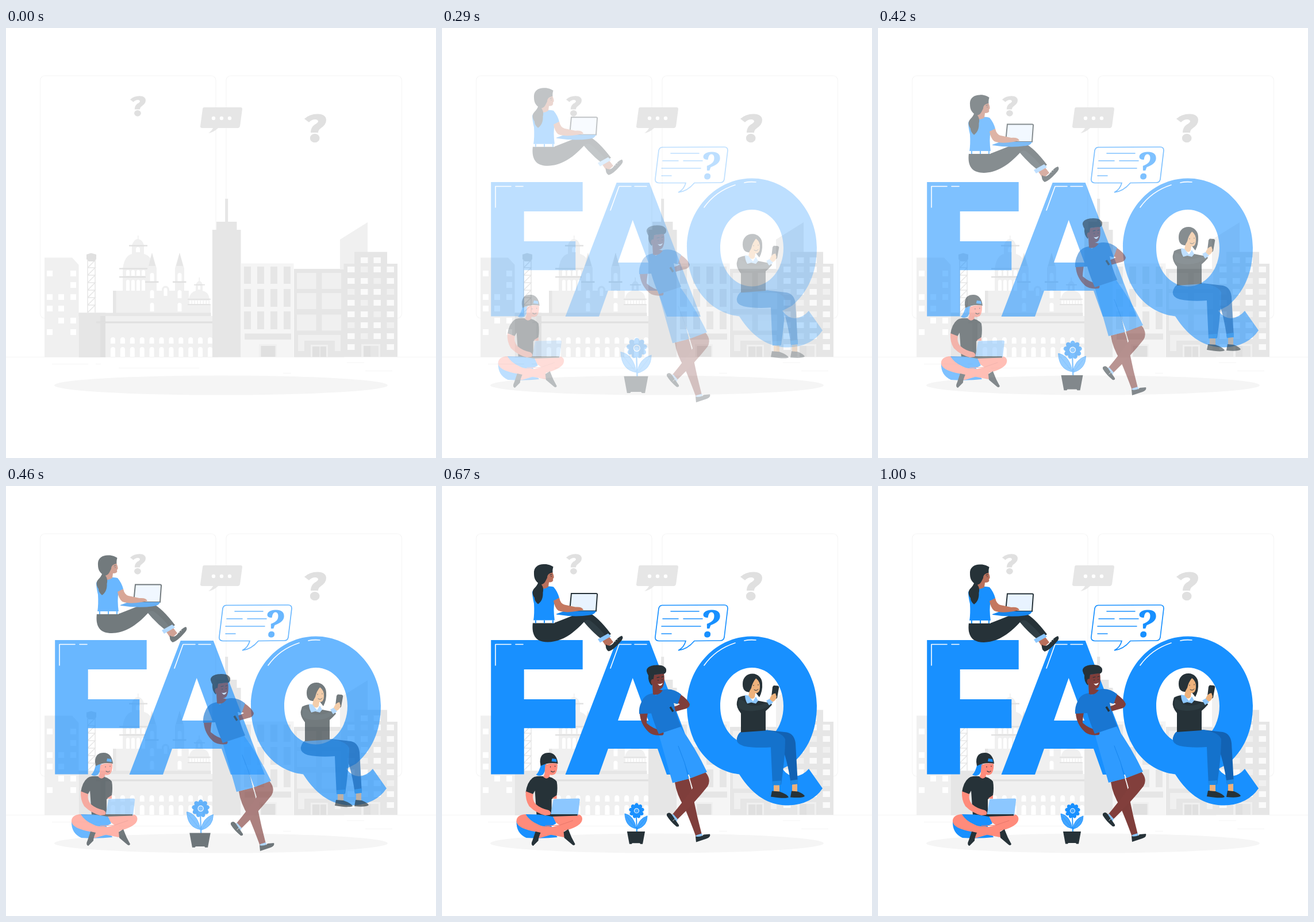
Animation of 748x748 px, one loop 1.04 s. Source, as an HTML page:

```html
<!DOCTYPE html>
<html lang="en">
<head>
<meta charset="utf-8">
<title>FAQ</title>
<style>
html, body { margin: 0; width: 100%; height: 100%; overflow: hidden; background: #fff; }
svg { display: block; width: 100vw; height: 100vh; }
.line { fill: none; stroke-linecap: round; stroke-linejoin: round; }
</style>
</head>
<body>
<svg viewBox="0 0 748 748" aria-label="FAQ">
  <defs>
    <g id="ask">
      <path d="M519 158Q528 149.500 542 149.500C552 149.500 557 154 557 160Q557 168 548 174Q543 177 543 182H530Q530 173 537 168Q543 165 543 162Q542 159 538 159Q532 159 527 164Z"/>
      <ellipse cx="537.200" cy="191.700" rx="8.300" ry="7.600"/>
    </g>
  </defs>

  <g fill="none" stroke="#f5f5f5" stroke-width="1.2">
    <rect x="59.5" y="83" width="305.5" height="422" rx="8"/>
    <rect x="383" y="83" width="305.5" height="422" rx="8"/>
    <path d="M0 572.5H748M80 584.5H143M156 584.5H165M196 591.5H336M482 600.5H496M593 582H623M625 596.5H672"/>
  </g>
  <ellipse cx="374" cy="621.5" rx="290" ry="17" fill="#f5f5f5"/>
  <g id="city"></g>
  <path d="M345 138H408Q411 138 411 141L407 171Q406 174 403 174H369Q362 181 352 183Q358 179 360 174H341Q338 174 338 171L342 141Q342 138 345 138Z" fill="#e6e6e6"/>
  <g fill="#fff"><circle cx="361" cy="157" r="3.2"/><circle cx="375" cy="157" r="3.2"/><circle cx="389" cy="157" r="3.2"/></g>
  <g fill="#e0e0e0"><use href="#ask"/><use href="#ask" transform="translate(-152.5 12.2) scale(.71)"/></g>

  <g id="letters">
    <g fill="#1890ff">
      <path d="M85.200 268H244.700V319H142.700V371H232.300V421.300H142.700V501.500H85.200Z"/>
      <path fill-rule="evenodd" d="M303.700 269H360.700L450 502H391L375 457H289L273 502H214.500ZM331.700 334L306 408H359Z"/>
      <path fill-rule="evenodd" d="M426 382C426 315 477 261.500 539 261.500S652 315 652 382C652 428 635 461 609 483L592 492Q602 505 614 505Q628 504 638 492L662 526Q643 554 603 555.500C575 556 545 545 517 501.500C463 495 426 447 426 382ZM484 382.500C484 420 508 449.500 539 449.500S594 420 594 382.500S570 316 539 316S484 345 484 382.500Z"/>
    </g>
    <path class="line" stroke="#fff" stroke-width="1.6" d="M93 312V275.500H120M128 275.500H141M293 317L308 275.500H329M335 275.500H356M456 312Q476 284 510 273M526 269Q535 267 546 268"/>
  </g>

  <g id="bubble">
    <path d="M383 207.500L491 207Q497 207 497 213L491 263Q490 269 484 269L439 269.500Q427 284 411 286Q421 281 424 269.500H377Q370 269 371 262L377 213Q378 208 383 207.500Z" fill="#fff" stroke="#1890ff" stroke-width="1.7"/>
    <path class="line" stroke="#1890ff" stroke-width="1.6" d="M398 218H447M384 231H411M420 231H453M382 244H450M382 257H399"/>
    <text x="448" y="263" fill="#1890ff" font-family="'Noto Serif', serif" font-size="65" font-weight="700" font-style="italic">?</text>
  </g>

  <g id="reader">
    <path fill="#1890ff" d="M166 178Q184 173 194 176Q201 184 204 195L196 201Q193 213 196 235H159Q161 222 160 205Q157 192 157 185Q158 180 166 178Z"/>
    <path fill="#b9705c" d="M178 150H192Q195 157 194.500 160L193 162Q195 168 186 168L185 176Q178 181 172 178L173 160Z"/>
    <path fill="#263238" d="M160 153C159 142 167 136.500 177 136.500C185 136 190 139 193.500 141Q192 146 192.500 151C186 152 183 155 183 160L180 166C178 170 175 171 173 172C176 176 177 180 175.500 186C176 195 173 202 167 206C164 203 161 200 161 195C156 188 157 182 161 178C164 175 166 172 167 169C162 165 160 160 160 153Z"/>
    <path class="line" stroke="#263238" d="M188 155L191 154M190 157V158"/>
    <path fill="#263238" d="M158 238H197Q215 231 235 223Q247 218 256 221Q272 229 294 258L279 268Q262 255 247 237C225 261 205 271.500 184 272C165 272 155 262 158 238Z"/>
    <path fill="#37474f" d="M247 237Q250 232 257 234Q273 246 286 263L279 268Q262 255 247 237Z" opacity=".55"/>
    <path fill="#fff" d="M159 234H196V239H158Z"/>
    <path stroke="#1890ff" stroke-width="2" d="M163 234V239M178 234V239M193 234V239"/>
    <path d="M225 187.500H268Q270.500 187.500 270 190L268 218H222Z" fill="#e8f3ff" stroke="#263238" stroke-width="2"/>
    <path fill="#1685ee" d="M199 223L213 218L268 218Q266 224 257 225Q230 229 199 224Z"/>
    <path fill="#c4785f" d="M194 200L204 195Q206 205 213 207L232 211Q244 210 246 216L236 218Q214 222 202 217Q196 212 194 200Z"/>
    <path fill="#b9705c" d="M279 270L291 263L298 272L287 282Z"/>
    <path fill="#8cc7ff" d="M271 267L289 257L294 262L275 273Z"/>
    <path fill="#263238" d="M285 276Q292 281 298 274Q306 263 313 261Q317 265 310 272Q298 286 290 288Q284 285 285 276Z"/>
    <path class="line" stroke="#fff" stroke-width=".8" d="M298 268L302 271M302 264L305 268"/>
  </g>

  <g id="boy">
    <path fill="#1890ff" d="M130 583Q129 604 147 612Q175 614 201 611L190 590Z"/>
    <path fill="#1890ff" d="M173 483L183 484Q181 495 176 502Q169 506 164 502Q169 499 173 483Z"/>
    <path fill="#ff8b7b" d="M180 485Q190 481 201 483Q202 495 197 501Q192 504 188 502L187 509Q180 513 175 507Q180 502 179 496Z"/>
    <path fill="#263238" d="M171 480C171 468 177 464 186 464C195 464 201 471 202 483Q186 480 172 487Z"/>
    <path fill="#1890ff" d="M192 474L199 475L200 480L191 479Z"/>
    <path class="line" stroke="#263238" stroke-width="1.200" d="M189 488V489M197 487V488M190 496Q194 499 196 496"/>
    <path fill="#263238" d="M161 506Q168 504 176 505Q182 512 187 506Q195 508 200 514Q202 525 200 538L191 545V573H165L162 530L158 537L146 533Q149 512 161 506Z"/>
    <path fill="#ff8b7b" d="M150 571C136 570 129 576 130 584C131 592 143 597 156 600L212 611L219 605L208 597L178 590L168 573Z"/>
    <path fill="#ff8b7b" d="M191 574L235 571C246 571 247 582 240 588C232 595 218 599 205 602L172 612Q163 613 164 606Q166 599 205 590Q193 583 191 574Z"/>
    <path fill="#1890ff" d="M146 571L192 572L199 587C190 593 178 594 168 589Q152 582 146 571Z"/>
    <path class="line" stroke="#e8776b" stroke-width="1" d="M180 591L205 590L228 582"/>
    <path fill="#263238" d="M163 601L172 603Q168 612 168 617L159 626Q154 624 158 616Z"/>
    <path fill="#263238" d="M212 602L220 597Q225 611 232 623Q230 627 226 623L213 612Z"/>
    <path fill="#8cc7ff" d="M194 546Q195 544 198 544.500L238 543.500Q241 544 240 547L237 573L189 574Z"/>
    <path fill="#263238" d="M168 571H236V573.500L192 575Z"/>
    <path fill="#ff8b7b" d="M146 531L159 536Q157 546 163 553Q172 561 186 564Q192 568 188 572L180 573Q164 569 152 557Q145 546 146 531ZM192 543L200 538V544H195Z"/>
  </g>

  <g id="leaner">
    <path fill="#7f3e3b" d="M405 515L429 508Q434 522 438 546Q444 576 452 606L442 610Q431 580 421 557Q408 536 405 515Z"/>
    <path fill="#823f3c" d="M431 508L458 497Q469 510 462 522Q440 550 409 580L399 573Q420 548 436 525Z"/>
    <path fill="#8cc7ff" d="M402 570L410 579L408 583L399 573ZM442 607L452 604L454 609L442 612Z"/>
    <path fill="#263238" d="M391 570Q396 565 401 573L412 589Q413 593 408 592Q397 583 391 573ZM441 609Q449 611 455 606L466 605Q468 610 460 613L442 619Z"/>
    <path class="line" stroke="#fff" stroke-width=".8" d="M402 582L405 579M453 608L455 604"/>
    <path fill="#2f9bff" d="M377 431L414 418Q441 455 461 497L432 508L422 481L429 509L401 516Q388 470 377 431Z"/>
    <path class="line" stroke="#1685ee" d="M411 452L422 481L429 508"/>
    <path fill="#7f3e3b" d="M344 395L358 394Q356 406 356 412Q367 422 382 425Q388 429 384 433Q368 435 360 428Q345 414 344 395Z"/>
    <path fill="#7f3e3b" d="M409 377L415 362Q428 371 431 379Q431 386 420 388L402 393Q396 404 390 403Q390 397 394 390Q398 384 408 382L414 379Z"/>
    <path fill="#1976d2" d="M347 375Q352 362 367 360L372 364L384 354Q401 350 416 362L410 379L403 377Q406 395 416 418L377 431Q368 410 364 395L343 396Q342 385 347 375Z"/>
    <path fill="#7f3e3b" d="M363 329L386 325Q388 339 385 347Q383 353 377 353L384 355Q377 365 367 362L366 345Z"/>
    <path fill="#263238" d="M356 322C355 314 365 311 375 311C386 311 391 316 390 321C390 325 387 327 383 326L369 328Q368 337 365 347Q358 340 359 329Q357 326 356 322Z"/>
    <ellipse cx="366.500" cy="340" rx="3" ry="4.500" fill="#7f3e3b"/>
    <path fill="#fff" d="M375 343.500Q380 345 384 342Q382 348 378 346.500Z"/>
    <path class="line" stroke="#263238" stroke-width="1.200" d="M374 333L378 332M382 332L385 331M376 337V338M383 336V337"/>
    <path stroke="#263238" stroke-width="3.500" d="M397 384L402 392"/>
  </g>

  <g id="caller">
    <path fill="#1262b3" d="M565 424L600 428Q613 431 615 447L619 518L607 519Q603 490 597 470L588 440Z"/>
    <path fill="#1472cc" d="M520 427L565 424Q592 428 597 440Q597 470 590 519L575 520Q573 480 572 454Q545 456 525 452Q511 448 513 438Q515 430 520 427Z"/>
    <path fill="#1e88e5" d="M575 513L590 512L589 520H575ZM606 512L619 510V518L607 519Z"/>
    <path fill="#eeb27c" d="M577 520H587V533H577ZM609 519L618 518V532H609Z"/>
    <path fill="#263238" d="M574 530L587 531Q601 536 603 541Q598 544 572 540ZM608 530L619 531Q629 535 631 539Q627 543 606 541Z"/>
    <path fill="#263238" d="M523 344C523 333 530 326 540 326C550 326 557 334 557 343Q558 356 552 367Q548 362 545 358H533Q523 357 523 344Z"/>
    <path fill="#eeb27c" d="M538 346Q541 337 546 334Q554 340 553 350Q553 360 545 360L544 367Q539 373 533 365L535 355Z"/>
    <path fill="#263238" d="M525 340Q534 330 547 333Q540 341 538 351L534 358Q525 353 525 340Z"/>
    <path class="line" stroke="#263238" d="M542 346V347M550 345V346M543 354Q547 357 550 353"/>
    <path fill="#263238" d="M515 368Q522 364 529 364L538 374L546 376L550 373L565 376L571 375L574 380Q568 387 563 391V425L520 428V395Q511 384 513 375Z"/>
    <path fill="#37474f" d="M516 372Q523 369 530 379Q544 386 566 376L571 380Q560 390 540 391Q520 391 516 384Z" opacity=".45"/>
    <path fill="#8cc7ff" d="M527 363L533 364L541 374L546 366L550 373L546 378L538 376L531 378Q527 371 527 363ZM564 373L571 369L576 376L569 381Z"/>
    <path fill="#263238" d="M577 346.500L584 347Q587 348 586 351L583 368Q582 371 575 369Q573 368 573 366L575 349Z"/>
    <path fill="#eeb27c" d="M570 370Q573 361 580 360L582 366Q581 373 575 375Z"/>
  </g>

  <g id="plant">
    <path class="line" stroke="#1890ff" stroke-width="1.800" d="M338 572L339 602"/>
    <path fill="#42a5ff" stroke="#1890ff" stroke-width=".8" d="M318 570Q334 573 338 596Q319 593 318 570ZM357 574Q357 592 339 597Q341 579 357 574Z"/>
    <path class="line" stroke="#1890ff" stroke-width=".7" d="M321 575L337 595M354 578L340 596"/>
    <g id="petals" fill="#1890ff"></g>
    <circle cx="338.500" cy="565" r="4.400" fill="#fff"/>
    <circle cx="338.500" cy="565" r="3.500" fill="#42a5ff"/>
    <path fill="#263238" d="M322 601H353L349 622.500H345L344 621H331L330 622.500H326Z"/>
  </g>
</svg>
<script>
const $ = id => document.getElementById(id);
const G = { mid: '#e6e6e6', pale: '#f0f0f0', dark: '#e0e0e0', faint: '#f5f5f5', white: '#fff' };

let markup = '';
const shape = (d, fill) => { markup += `<path d="${d}" fill="${fill}"/>`; };
const box = (x, y, w, h, fill) => shape(`M${x} ${y}h${w}v${h}h${-w}z`, fill);
const grid = (xs, ys, w, h, fill) => ys.forEach(y => xs.forEach(x => box(x, y, w, h, fill)));
const arch = (cx, top, w, h) => {
  const r = w / 2;
  shape(`M${cx - r} ${top + h}v${r - h}a${r} ${r} 0 0 1 ${w} 0v${h - r}z`, G.white);
};

function leftBlock() {
  shape('M67 399.5H115L126.5 412V572.5H67Z', G.pale);
  const rows = { 422: [71, 112], 442: [112], 463: [71, 91, 112], 483: [71, 91], 504: [91, 112], 524: [71, 112] };
  for (const y in rows) grid(rows[y], [+y], 10, 10, G.white);
}

function mast() {
  let d = 'M142 404V495M155 404V495';
  for (let i = 0; i < 7; i++) {
    const y = 404 + i * 13;
    d += `M142 ${y}H155L142 ${y + 13}`;
  }
  markup += `<path d="${d}" fill="none" stroke="${G.mid}" stroke-width="1.5"/>`;
  shape('M140 394L148 391.500L157 394V402L153 406H144L140 402Z', G.dark);
}

function spire(cx) {
  shape(`M${cx} 391L${cx + 8} 418V497H${cx - 8}V418Z`, G.pale);
  shape(`M${cx} 391L${cx + 6} 414H${cx - 6}Z`, G.mid);
  arch(cx, 426, 7, 15);
  arch(cx, 456, 7, 14);
  arch(cx, 478, 7, 15);
  box(cx - 12, 440.5, 23.5, 2.6, G.dark);
}

function cathedral() {
  box(186, 457, 60, 39, G.pale);
  box(186, 457, 5.5, 39, G.mid);
  shape('M203 457V419Q206 396 219 393V378Q222 368 229 367V361H230.500V367Q238 369 240 378V393Q254 396 257 419V457Z', G.pale);
  arch(229.5, 381, 7, 9);
  [212, 221, 230, 239].forEach(x => { arch(x, 421, 6, 10); arch(x, 438, 6, 19); });
  [[214, 377.5, 32], [197, 417.5, 49], [197, 432, 46]].forEach(([x, y, w]) => box(x, y, w, 2.3, G.dark));
  box(246, 457, 72, 40, G.pale);
  shape('M271 458V455A6.500 6.500 0 0 1 284 455V458Z', G.pale);
  arch(277.5, 452, 6, 14);
  spire(254);
  spire(302);
  shape('M317 496V481H318V471Q321 459 330 457V446Q333 441 335.500 440V434H337V440Q341 442 342 446V457Q352 459 354 471V481H356V496Z', G.pale);
  arch(336, 448, 4, 7);
  for (let x = 319; x < 354; x += 5) box(x, 474, 3.5, 6, G.white);
  box(327, 446, 19, 1.5, G.dark);
  box(316, 471, 40, 1.6, G.dark);
  box(316, 480.5, 40, 1.6, G.dark);
}

function hall() {
  box(126.5, 495.5, 230, 6, G.mid);
  box(126.5, 495.5, 47, 77.5, G.mid);
  box(164, 501, 9, 71.5, G.dark);
  box(173, 501, 196, 71.5, G.pale);
  for (let i = 0; i < 11; i++) {
    arch(186 + i * 16.9, 538, 8, 11);
    arch(186 + i * 16.9, 555, 8, 17);
  }
  box(157, 510.5, 218, 3, G.dark);
}

function tower() {
  box(381.2, 297, 5, 41, G.mid);
  box(366, 337, 35.5, 15, G.mid);
  box(359, 351, 49.5, 221.5, G.mid);
}

function offices() {
  box(408.5, 409.5, 92, 163, G.faint);
  [[415, 30], [454, 31], [493, 31]].forEach(([y, h]) => grid([414, 437, 460, 483], [y], 12, h, G.mid));
  box(415, 531.5, 81, 10.5, G.mid);
  box(440, 550, 31, 22, G.pale);
  box(443.5, 553, 25, 19, G.dark);

  box(501, 419, 87, 153.5, G.mid);
  grid([506, 549.5], [426, 461, 498.5], 33.5, 28, G.pale);
  shape('M508 534H582V562H572V544H519V562H508Z', G.pale);
  box(530, 551, 30, 21, G.pale);
  box(533, 554, 24, 18, G.dark);
  box(545.5, 554, 1.2, 18, G.pale);

  shape('M581 368L629 338V410H581Z', G.pale);
  box(581, 405, 7, 15, G.pale);
  shape('M587.500 410H606V389.500H663V410H681V572H587.500Z', G.mid);
  const cols = [594, 617, 639.5, 662.5];
  [399, 415, 435, 454, 473, 493, 512, 531, 550].forEach((y, r) => cols.forEach((x, c) => {
    const edge = c === 0 || c === 3;
    if ((r === 0 && edge) || (r === 8 && !edge)) return;
    box(x, y, 12.5, 10, (r * 2 + c) % 3 ? '#fafafa' : G.pale);
  }));
  box(618, 550, 33, 22, G.pale);
  box(622, 553, 26, 19, G.dark);
  box(634, 553, 14, 19, G.mid);
}

[leftBlock, mast, cathedral, hall, tower, offices].forEach(draw => draw());
$('city').innerHTML = markup;

let petals = '';
for (let i = 0; i < 9; i++)
  petals += `<ellipse cx="338.5" cy="556.5" rx="3.6" ry="4.8" transform="rotate(${i * 40} 338.5 565)"/>`;
$('petals').innerHTML = petals;

// Cubic easing with a slight overshoot, solved by bisection.
const cubic = (a, b, s) => 3 * (1 - s) ** 2 * s * a + 3 * (1 - s) * s * s * b + s ** 3;
function ease(u) {
  if (u <= 0 || u >= 1) return u <= 0 ? 0 : 1;
  let lo = 0, hi = 1;
  for (let i = 0; i < 24; i++) {
    const s = (lo + hi) / 2;
    if (cubic(0.39, 0.5, s) < u) lo = s; else hi = s;
  }
  return cubic(-0.01, 1.4, lo);
}

const LOOP = 1040, FPS = 24, SHIFT = 45;
const groups = ['letters', 'bubble', 'reader', 'boy', 'leaner', 'caller', 'plant'].map($);
const place = (id, value) => $(id).setAttribute('transform', value);

function render(now) {
  const t = now % LOOP;
  const step = Math.min(FPS, Math.floor((t + 4) * FPS / 1000));
  const p = step < 2 ? 0 : ease(step / FPS);
  const alpha = step >= 14 ? 1 : Math.max(0, p);
  const off = SHIFT * (1 - p);
  groups.forEach(g => g.setAttribute('opacity', alpha));
  place('reader', `translate(0 ${-off})`);
  place('boy', `translate(${-off} 0)`);
  place('leaner', `translate(0 ${off})`);
  place('caller', `translate(0 ${off})`);
  place('plant', `translate(337.5 587.5) scale(${1 + 0.5 * (1 - p)}) translate(-337.5 -587.5)`);
}

const start = performance.now();
function tick() {
  render(performance.now() - start);
  requestAnimationFrame(tick);
}
tick();
</script>
</body>
</html>
```
